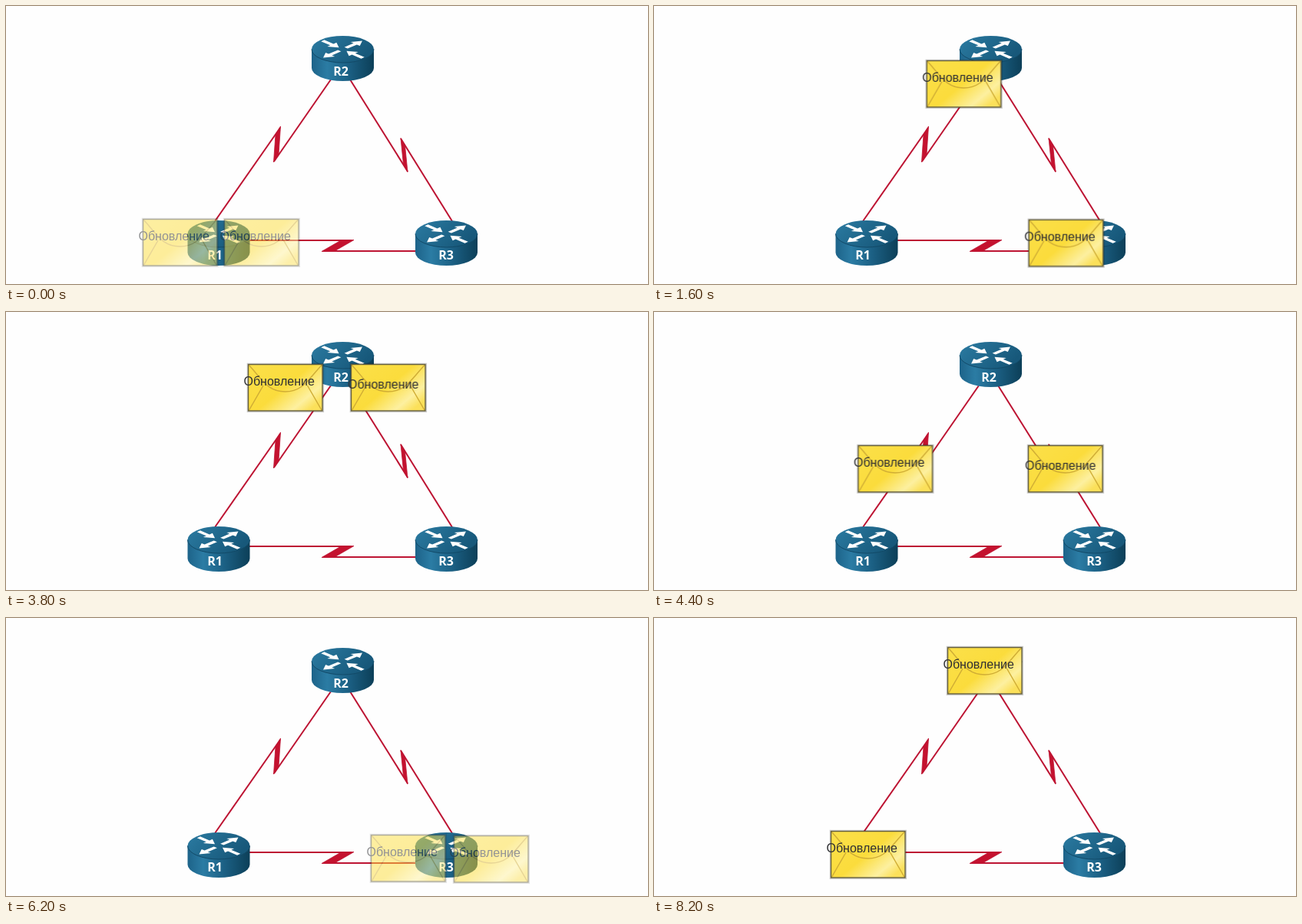
Animation, 836 px wide and 363 px high, one loop 8.6 s. Source, as an HTML page:

```html
<!DOCTYPE html>
<html lang="ru">
<head>
<meta charset="utf-8">
<title>Обмен обновлениями</title>
<style>
html, body { margin: 0; width: 100%; height: 100%; overflow: hidden; background: #fefefe; }
svg { display: block; width: 100%; height: 100%; }
.name { font: 700 16px "Open Sans", sans-serif; fill: #fff; text-anchor: middle; }
.note { font: 16px "Liberation Sans", Arial, sans-serif; fill: #2f3033; }
.link { fill: #c4122f; stroke: #bd1433; stroke-width: 2; stroke-linejoin: miter; }
.link path:last-child { stroke-width: .8; }
.mail, .shift { animation: 8.6s step-end infinite; }
.a { animation-name: mail-a; }
.b { animation-name: mail-b; }
.shift { animation-name: shift; }

/* Three rounds: R1 sends, then R2, then R3 */
@keyframes mail-a {
  0%      { transform: translate(178px, 278px); opacity: .52; }
  2.325%  { transform: translate(178px, 278px); opacity: .85; }
  4.651%  { transform: translate(189px, 266px); opacity: 1; animation-timing-function: steps(3); }
  11.627% { transform: translate(273px, 170px); opacity: 1; animation-timing-function: steps(4); }
  20.93%  { transform: translate(382px, 38px); opacity: 1; }
  25.581% { transform: translate(329px, 38px); opacity: 0; }
  34.883% { transform: translate(329px, 38px); opacity: .52; }
  44.186% { transform: translate(315px, 68px); opacity: 1; animation-timing-function: steps(4); }
  53.488% { transform: translate(249px, 209.3px); opacity: 1; }
  58.139% { transform: translate(216px, 280px); opacity: 1; }
  62.79%  { transform: translate(475px, 283px); opacity: 0; }
  72.093% { transform: translate(475px, 283px); opacity: .52; }
  81.395% { transform: translate(420px, 281px); opacity: 1; animation-timing-function: steps(2); }
  86.046% { transform: translate(357px, 280.5px); opacity: 1; }
  90.697% { transform: translate(293.5px, 279px); opacity: 1; animation-timing-function: steps(2); }
  95.348%, 100% { transform: translate(230px, 278px); opacity: 1; }
}
@keyframes mail-b {
  0%      { transform: translate(284px, 278px); opacity: .52; }
  2.325%  { transform: translate(284px, 278px); opacity: .85; }
  4.651%  { transform: translate(306px, 278px); opacity: 1; animation-timing-function: steps(3); }
  11.627% { transform: translate(397px, 278px); opacity: 1; animation-timing-function: steps(4); }
  20.93%  { transform: translate(518px, 279px); opacity: 1; }
  25.581% { transform: translate(438px, 38px); opacity: 0; }
  34.883% { transform: translate(438px, 38px); opacity: .52; }
  44.186% { transform: translate(449px, 68px); opacity: 1; animation-timing-function: steps(4); }
  53.488% { transform: translate(499.7px, 209.3px); opacity: 1; }
  58.139% { transform: translate(525px, 280px); opacity: 1; }
  62.79%  { transform: translate(583px, 284px); opacity: 0; }
  72.093% { transform: translate(583px, 284px); opacity: .52; }
  81.395% { transform: translate(538px, 228.5px); opacity: 1; animation-timing-function: steps(2); }
  86.046% { transform: translate(486px, 165px); opacity: 1; }
  90.697% { transform: translate(434px, 101.5px); opacity: 1; animation-timing-function: steps(2); }
  95.348%, 100% { transform: translate(382px, 38px); opacity: 1; }
}
@keyframes shift {
  0%, 62.79%, 100% { transform: translate(0, 0); }
  25.581% { transform: translate(1.5px, 4px); }
}
</style>
</head>
<body>
<svg viewBox="0 0 836 363" preserveAspectRatio="none">
  <defs>
    <linearGradient id="side">
      <stop offset="0" stop-color="#1d6389"/>
      <stop offset=".25" stop-color="#2b7ca4"/>
      <stop offset=".6" stop-color="#1b5f83"/>
      <stop offset="1" stop-color="#0c3f58"/>
    </linearGradient>
    <linearGradient id="lid" x1="0" y1="0" x2="1" y2=".4">
      <stop offset="0" stop-color="#2b7ba2"/>
      <stop offset="1" stop-color="#17587a"/>
    </linearGradient>
    <linearGradient id="paper" x1="0" y1="0" x2="1" y2=".75">
      <stop offset="0" stop-color="#fbe04a"/>
      <stop offset=".55" stop-color="#fbdc3c"/>
      <stop offset=".85" stop-color="#fdf0a0"/>
      <stop offset="1" stop-color="#fbe05a"/>
    </linearGradient>
    <path id="arrow" d="M0-3H17V-8.5L30 0 17 8.5V3H0Z"/>
    <g id="router">
      <path d="M-40.5 0V24.5A40.5 17 0 0 0 40.5 24.5V0Z" fill="url(#side)"/>
      <ellipse rx="40.5" ry="17.5" fill="url(#lid)"/>
      <path d="M-40.5 0A40.5 17.5 0 0 0 40.5 0" fill="none" stroke="#124a68" stroke-width="1"/>
      <g transform="scale(1 .43)" fill="#fff">
        <use href="#arrow" transform="rotate(45) translate(-37)"/>
        <use href="#arrow" transform="rotate(225) translate(-37)"/>
        <use href="#arrow" transform="rotate(-45) translate(6)"/>
        <use href="#arrow" transform="rotate(135) translate(6)"/>
      </g>
    </g>
    <g id="mail">
      <rect x="-.3" y="-.3" width="98.4" height="62.4" fill="none" stroke="#000" stroke-opacity=".2" stroke-width="2"/>
      <rect x=".5" y=".5" width="96.5" height="60.5" fill="url(#paper)"/>
      <g fill="none" stroke="#d0ad35" stroke-width="1.5">
        <path d="M1 61L20 28M96.500 61L77.500 28"/>
        <path d="M1 1C18 19 25 36 48.500 36S79 19 96.500 1"/>
      </g>
      <rect x=".5" y=".5" width="96.5" height="60.5" fill="none" stroke="#66603d" stroke-width="1.4"/>
    </g>
  </defs>

  <g class="link">
    <path d="M272 281L357 159M349 203L423 96"/>
    <path d="M357.500 157L355 194 348.500 204 351 168Z"/>
  </g>
  <g class="link">
    <path d="M448 96L523 216M514 173L581 281"/>
    <path d="M523 217L519.500 182 514 172.500 517.500 207Z"/>
  </g>
  <g class="link">
    <path d="M316 306H450M413 320H534"/>
    <path d="M453 305.500H437L411 320.500H427Z"/>
  </g>

  <use href="#router" x="438.500" y="56.500"/>
  <use href="#router" x="277" y="297.500"/>
  <use href="#router" x="573.500" y="297.500"/>
  <text class="name" x="436" y="90.500">R2</text>
  <text class="name" x="272" y="330.500">R1</text>
  <text class="name" x="573" y="330.500">R3</text>

  <g class="mail a">
    <use href="#mail"/>
    <text class="note" x="-5.500" y="28">Обновление</text>
  </g>
  <g class="mail b">
    <use href="#mail"/>
    <text class="note shift" x="-5.500" y="28">Обновление</text>
  </g>
</svg>
</body>
</html>
```
